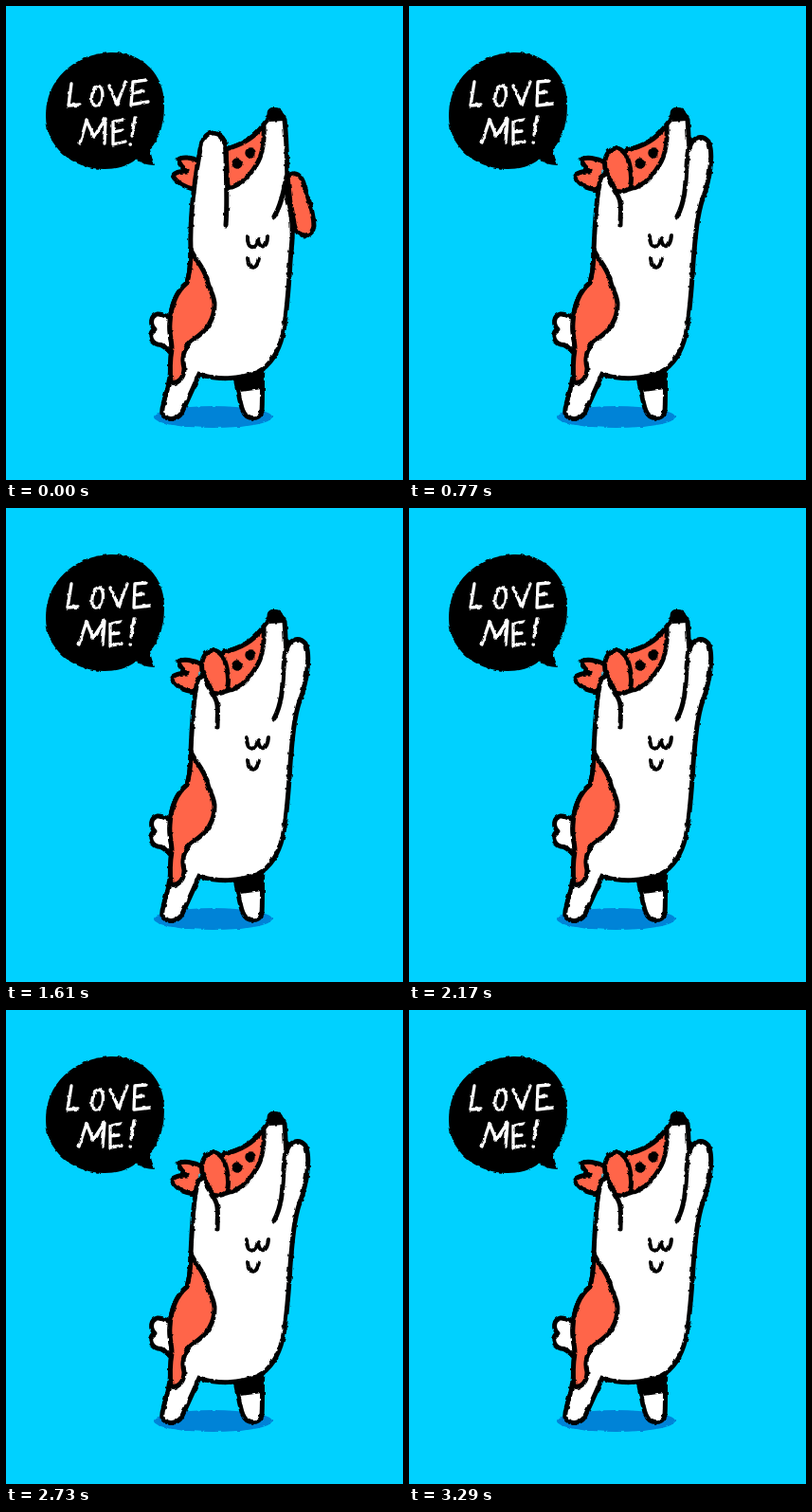
Recreate the animation shown at these times as an HTML page. Size 419 px wide and 500 px high, loop 3360 ms.

```html
<!DOCTYPE html>
<html lang="en">
<head>
<meta charset="utf-8">
<title>Love me!</title>
<style>
  html, body { margin: 0; width: 100%; height: 100%; overflow: hidden; background: #00d1ff; }
  svg { display: block; width: 419px; height: 500px; }
  path { stroke: #000; stroke-width: 5; stroke-linecap: round; stroke-linejoin: round; fill: none; }
  .white { fill: #fff; }
  .orange { fill: #ff6549; }
  .solid { fill: #000; }
  .bare { stroke: none; }
  .thin { stroke-width: 4; }
  .letters path { stroke: #fff; stroke-width: 3.3; }
  /* The small lead keeps each swap safely on its 70 ms beat. */
  .left-up { animation: first-half 140ms -2ms step-end infinite; }
  .right-up { animation: second-half 140ms -2ms step-end infinite; }
  @keyframes first-half {
    0% { visibility: visible; }
    50%, 100% { visibility: hidden; }
  }
  @keyframes second-half {
    0% { visibility: hidden; }
    50%, 100% { visibility: visible; }
  }
</style>
</head>
<body>
<svg viewBox="0 0 419 500" role="img" aria-label="A begging dog says: LOVE ME!">
  <defs>
    <filter id="rough" filterUnits="userSpaceOnUse" x="0" y="0" width="419" height="500" color-interpolation-filters="sRGB">
      <feTurbulence type="fractalNoise" baseFrequency=".17" numOctaves="2" seed="4"/>
      <feDisplacementMap in="SourceGraphic" scale="3.2" xChannelSelector="R" yChannelSelector="G"/>
    </filter>
  </defs>
  <rect width="419" height="500" fill="#00d1ff"/>
  <g filter="url(#rough)">
    <ellipse cx="218.500" cy="433.500" rx="62.500" ry="11.500" fill="#0083d7"/>

    <!-- speech bubble -->
    <path class="solid bare" d="M110 49C143 48 167 71 167 104C167 125 162 140 152 151C153 157 155 163 157 168C149 168 142 165 137 162C128 169 117 172 104 172C69 172 42 148 42 116C42 77 72 51 110 49Z"/>

    <!-- tail, hind leg, lower body -->
    <path class="white" d="M176 327C171 331 167 324 160 325C152 327 152 336 157 341C150 345 152 354 160 357C166 357 169 361 173 365"/>
    <path class="white" d="M241 389C245 402 246 417 250 427C254 437 268 437 270 428C271 411 270 394 271 380Z"/>
    <path class="solid bare" d="M240 389L271 379L270 404L248 407Z"/>
    <path class="white" d="M195 256C195 272 194 282 191 292C180 301 174 317 173 334C172 346 175 352 175 362C173 374 175 385 172 396C170 410 163 424 165 430C168 438 182 437 186 428C192 415 198 402 204 388C221 395 247 394 266 386C281 378 288 363 292 347C297 325 298 298 301 256"/>

    <g class="left-up">
      <path class="orange" d="M204 164C196 159 185 159 182 162C183 168 187 171 191 174C184 174 178 176 176 179C180 187 189 191 200 194"/>
      <path class="orange" d="M297 180C305 173 312 178 315 190C319 203 325 218 325 232C323 243 315 244 308 239C302 233 304 221 300 208Z"/>
      <path class="white" d="M195 258C194 228 198 190 204 157C206 142 210 134 218 134C228 134 232 143 232 151C247 147 260 140 268 130L275 121C278 110 290 110 294 120C297 148 297 178 297 205C303 222 303 242 301 258"/>
      <path class="orange" d="M232 151C247 147 260 140 268 130L272 127C273 144 271 157 264 168C256 181 248 189 234 192Z"/>
      <path d="M232 151C232 180 234 205 232 231M296 180C293 197 290 211 283 222"/>
      <path class="thin" d="M255 243C254 257 264 258 266 246C267 257 276 256 276 243"/>
      <g class="letters">
        <path d="M69 82L66 105L78 104M97 85C90 86 88 104 94 106C104 106 104 84 97 85M109 84L117 104L126 80M134 80L132 104L150 101M134 80L148 78M133 92L145 90"/>
        <path d="M78 145L85 121L93 138L105 119L104 145M113 122L113 146L126 143M113 122L124 120M113 133L123 131M136 118L133 137M131 146L131.500 146"/>
      </g>
    </g>

    <g class="right-up">
      <path class="orange" d="M207 165C198 160 186 159 182 162C183 168 187 171 191 174C184 174 177 176 175 179C179 188 187 193 199 194"/>
      <path class="white" d="M195 258C196 234 197 208 201 188C202 179 206 175 212 178L230 152C247 148 260 141 268 130L275 121C278 110 290 110 294 120C295 132 295 143 296 150C299 138 309 135 316 143C321 154 318 176 313 195C305 214 303 235 301 258"/>
      <path class="orange" d="M230 152C247 148 260 141 268 130L272 127C273 144 271 157 264 168C256 181 248 190 233 193L219 194L212 180Z"/>
      <path class="orange" d="M207 172C205 158 211 151 219 150C227 151 231 159 233 169C235 178 235 186 233 192C228 196 222 197 218 194C214 187 211 181 207 172Z"/>
      <path d="M212 186C217 194 223 202 223 208C224 216 223 224 223 231M295 149C291 172 295 200 283 222"/>
      <path class="thin" d="M254 242C254 257 263 257 266 245C267 257 276 256 277 242"/>
      <g class="letters">
        <path d="M69 80L65 105L76 104M98 84C91 84 88 104 94 106C104 107 105 84 98 84M110 84L119 104L128 80M136 80L135 105L152 103M136 80L148 79M136 92L145 91"/>
        <path d="M77 144L85 120L92 137L104 119L102 144M110 122L110 145L122 143M110 122L121 120M110 133L119 132M135 117L132 136M131 144L131.500 144"/>
      </g>
    </g>

    <!-- nose, eyes, side patch, chin -->
    <path class="solid bare" d="M276 116C274 109 280 106 284 107C291 107 294 113 293 121L279 122Z"/>
    <circle cx="244" cy="166" r="5.700"/>
    <circle cx="258" cy="155" r="5.700"/>
    <path class="orange" d="M195 257C200 268 209 276 212 288C214 299 220 304 220 315C220 332 211 343 199 351C188 358 185 370 188 382C188 392 182 399 174 397C173 386 173 374 175 362C175 352 172 346 173 334C174 317 180 301 191 292C194 282 195 272 195 257Z"/>
    <path class="thin" d="M255 266C256 279 265 279 267 266"/>
  </g>
</svg>
</body>
</html>
```
